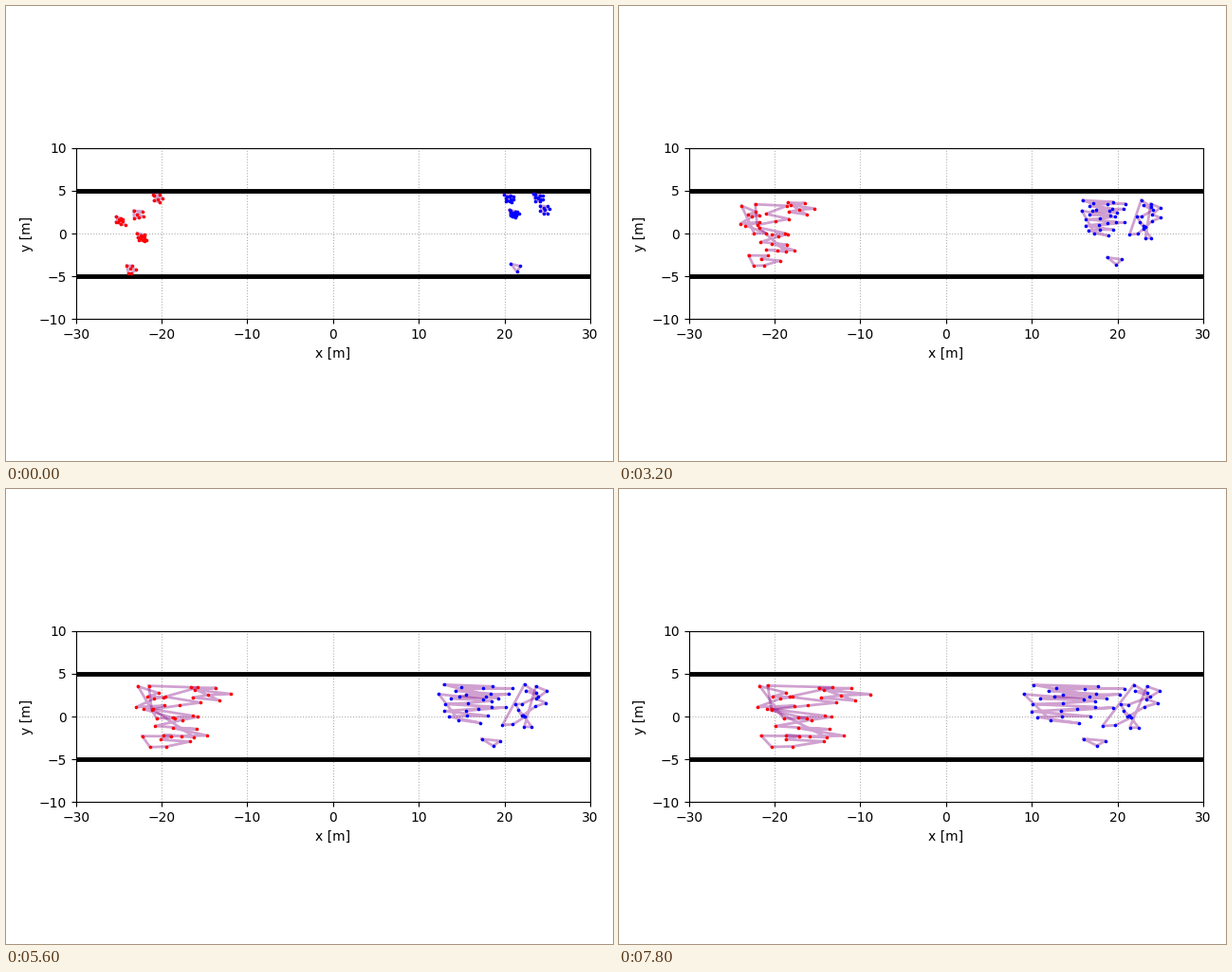
Write a matplotlib script that moves like this. It is 640 px wide and 480 px high and loops after 8000 ms.

```python
import numpy as np
import matplotlib.pyplot as plt
from matplotlib.animation import FuncAnimation

STEP = 200                        # ms per frame
FRAMES = 40
GOLDEN = (5 ** 0.5 - 1) / 2
PACK = np.array([0.55, 0.45])     # half size of a packed group, metres

rng = np.random.default_rng(4)
fig = plt.figure(figsize=(6.4, 4.8), dpi=100)
ax = fig.add_axes([73.6 / 640, 149.6 / 480, 542.5 / 640, 180.8 / 480])
ax.set_xlim(-30, 30)
ax.set_ylim(-10, 10)
ax.set_xlabel("x [m]")
ax.set_ylabel("y [m]")
ax.grid(linestyle=":")
for wall in (-5, 5):
    ax.plot([-30, 30], [wall, wall], color="black", lw=3.5)


def scaled(values):
    """Stretch values to the range -1 to 1."""
    return 2 * (values - values.min()) / np.ptp(values) - 1


class Group:
    """Walkers that start packed together and drift apart as they walk."""

    def __init__(self, color, n, start, end, size, lean=0):
        i = np.arange(n)
        jitter = rng.uniform(-0.12, 0.12, (2, n))
        across = scaled((i * GOLDEN) % 1 + jitter[0])
        down = scaled(-i / n + jitter[1])
        self.spots = np.column_stack([across, down])
        self.start, self.end, self.size = map(np.array, (start, end, size))
        self.lean = lean
        self.ties, = ax.plot([], [], color="purple", alpha=0.37, lw=2, zorder=3)
        self.dots, = ax.plot([], [], "o", color=color, ms=2.6, mew=0, zorder=4)

    def draw(self, k):
        # Steady walk along the corridor, quick push across it.
        ease = np.array([k, 1 - (1 - k) ** 3])
        centre = self.start + (self.end - self.start) * ease
        p = centre + self.spots * (PACK + (self.size - PACK) * ease)
        p[:, 0] += self.lean * k * self.spots[:, 1]
        self.dots.set_data(*p.T)
        self.ties.set_data(*np.vstack([p, p[:1]]).T)
        return self.ties, self.dots


# Colour, walkers, first centre, last centre, last half size, slant
groups = [
    Group("red", 10, (-24.8, 1.5), (-19.1, 1.65), (2.9, 1.9)),
    Group("red", 6, (-22.7, 2.2), (-16.8, 2.2), (4.0, 1.4)),
    Group("red", 7, (-20.4, 4.1), (-11.8, 2.6), (3.0, 0.75)),
    Group("red", 12, (-22.3, -0.4), (-16.1, -0.8), (4.2, 1.65)),
    Group("red", 6, (-23.5, -4.2), (-17.9, -2.9), (3.65, 0.65)),
    Group("blue", 12, (20.5, 4.1), (15.5, 2.9), (5.3, 0.8)),
    Group("blue", 16, (21.1, 2.3), (14.3, 0.9), (5.2, 1.7)),
    Group("blue", 11, (23.9, 4.2), (21.3, 1.3), (1.6, 2.4), 2.2),
    Group("blue", 8, (24.7, 2.8), (23.2, 1.1), (1.2, 2.4), 1.4),
    Group("blue", 3, (21.3, -4.0), (17.3, -3.0), (1.3, 0.4)),
]


def update(i):
    return [artist for g in groups for artist in g.draw(i / (FRAMES - 1))]


anim = FuncAnimation(fig, update, frames=FRAMES, interval=STEP,
                     init_func=lambda: update(0), repeat=True, repeat_delay=0)
plt.show()
```
